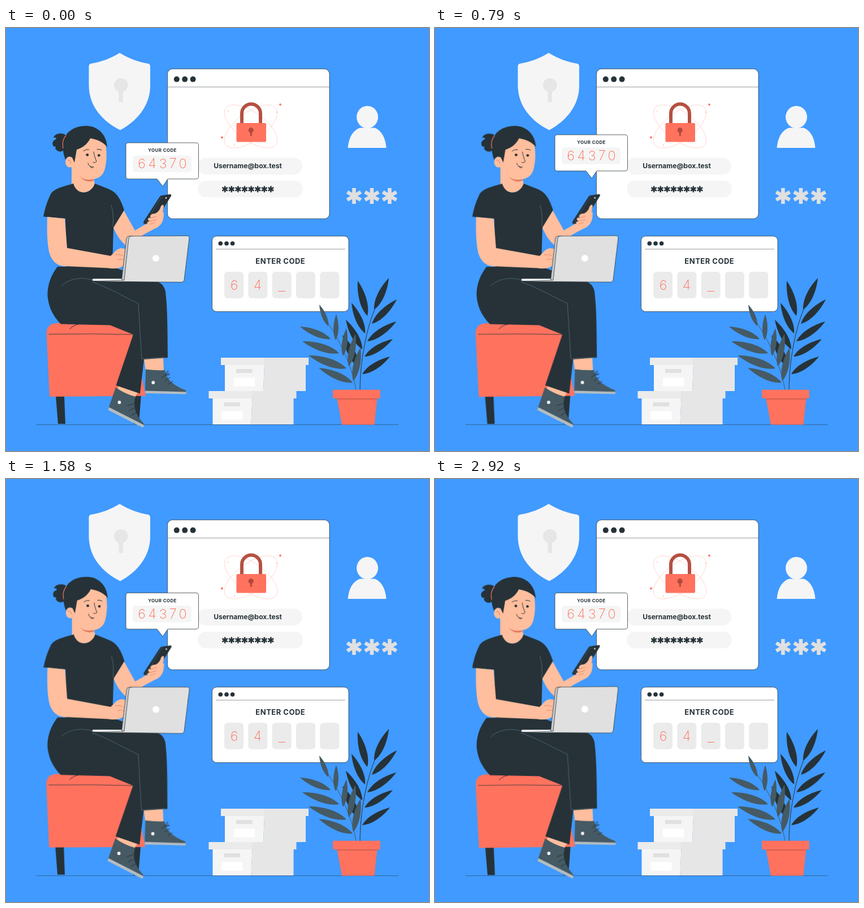
Write an HTML page that moves like this. It is 748x748 px and loops after 2.96 s.

```html
<!DOCTYPE html>
<html lang="en">
<head>
<meta charset="utf-8">
<title>Two-step sign-in</title>
<style>
  html, body { margin: 0; width: 100%; height: 100%; overflow: hidden; background: #409aff; }
  svg { display: block; width: 100%; height: 100%; }
  text { font-family: Inter, "Open Sans", sans-serif; font-weight: 700; fill: #263238; text-anchor: middle; }
  .digits { font-size: 23.5px; font-weight: 200; fill: #ff725e; }
  .dark { fill: #263238; }
  .coral { fill: #ff725e; }
  .skin { fill: #ffbe9d; }
  .slate { fill: #455a64; }
  .pale { fill: #f5f5f5; }
  .mist { fill: #ebebeb; }
  .shade { fill: #e6e6e6; }
  .grey { fill: #e0e0e0; }
  .white { fill: #fff; }
  .edge { stroke: #263238; stroke-width: .75; }
  .line { fill: none; stroke: #263238; stroke-width: 1; stroke-linecap: round; stroke-linejoin: round; }
  .rule { fill: none; stroke: #263238; stroke-width: .7; opacity: .7; }
  .seam { fill: none; stroke: #55707d; stroke-width: .8; stroke-linejoin: round; }

  /* 1.5 s cycles cut at 2.96 s, where the loop restarts */
  #person { transform-origin: 193px 440px; animation: sway 2.96s linear infinite; }
  #bubble { animation: hover 2.96s linear infinite; }
  @keyframes sway {
    0% { transform: rotate(0deg); }
    12.669% { transform: rotate(1deg); }
    38.007% { transform: rotate(-1deg); }
    63.345% { transform: rotate(1deg); }
    88.682% { transform: rotate(-1deg); }
    100% { transform: rotate(-.107deg); }
  }
  @keyframes hover {
    0%, 50.676% { transform: translateY(0); }
    25.338%, 76.014% { transform: translateY(-15px); }
    100% { transform: translateY(-.8px); }
  }
</style>
</head>
<body>
<svg viewBox="0 0 748 748">
  <defs>
    <g id="star"><path d="M0-14V14M-12-7L12 7M-12 7L12-7" fill="none" stroke-width="6.6"/></g>
    <g id="crate">
      <path class="pale" d="M7 13H77L75 59H7Z"/>
      <path class="shade" d="M77 13H150V59H75Z"/>
      <path class="mist" d="M0 0H77V13H0Z"/>
      <path class="shade" d="M76 0H155V13H76Z"/>
      <rect class="grey" x="27" y="20" width="28.5" height="7"/>
      <rect class="white" x="23" y="35.5" width="37" height="15"/>
    </g>
  </defs>

  <rect width="748" height="748" fill="#409aff"/>

  <g id="shield">
    <path class="pale" d="M201 44C185 54 168 60 150 63Q146.500 64 146.500 68V102C147 139 171 165 202 180.500C231 165 255 138 255 102V68Q255 64 251.500 63C234 60 217 54 201 44Z"/>
    <circle class="shade" cx="203.300" cy="101" r="12.300"/>
    <rect class="shade" x="199.500" y="108" width="7.500" height="23" rx="2"/>
  </g>

  <g id="user" class="pale">
    <ellipse cx="639" cy="157.500" rx="19" ry="19.800"/>
    <path d="M604.500 212C606 194 613 181 626 176.500H652C664 181 671 194 672.500 212Z"/>
  </g>
  <g id="bigStars" stroke="#e0e0e0"></g>

  <g id="login">
    <rect class="white edge" x="285.500" y="72.300" width="286.500" height="265" rx="9"/>
    <path class="rule" d="M286 104.300H572"/>
    <g class="dark"><circle cx="301.800" cy="90.600" r="5"/><circle cx="316.200" cy="90.600" r="5"/><circle cx="330.600" cy="90.600" r="5"/></g>
    <g fill="none" stroke="#ffd0c8" stroke-width=".8">
      <ellipse cx="433" cy="174" rx="55" ry="25" transform="rotate(36 433 174)"/>
      <ellipse cx="433" cy="174" rx="55" ry="25" transform="rotate(-36 433 174)"/>
    </g>
    <g class="coral">
      <circle cx="485" cy="135.300" r="1.900"/><circle cx="382" cy="193.500" r="1.900"/>
      <circle cx="479" cy="149" r=".7"/><circle cx="393" cy="147" r=".7"/><circle cx="404" cy="207" r=".8"/>
    </g>
    <path d="M417 171V151A16.500 16.500 0 0 1 450 151V171" fill="none" stroke="#b55042" stroke-width="6"/>
    <rect class="coral" x="407.500" y="168" width="52.500" height="33.500" rx="2"/>
    <g fill="#b04a3c"><circle cx="433.200" cy="180.700" r="4.600"/><rect x="431.800" y="182" width="3" height="9" rx="1"/></g>
    <rect class="pale" x="339" y="229.500" width="185" height="29.500" rx="14.700"/>
    <rect class="pale" x="339" y="270" width="186" height="29.500" rx="14.700"/>
    <text x="427.500" y="248" font-size="12">Username@box.test</text>
    <g id="smallStars" stroke="#263238"></g>
  </g>

  <g id="enter">
    <rect class="white edge" x="364.500" y="368" width="241.500" height="133.500" rx="8"/>
    <path class="rule" d="M371 391H600"/>
    <g class="dark"><circle cx="379.300" cy="381" r="3.800"/><circle cx="390" cy="381" r="3.800"/><circle cx="400.600" cy="381" r="3.800"/></g>
    <text x="485.300" y="416.700" font-size="13" letter-spacing=".5">ENTER CODE</text>
    <g id="slots" class="mist"></g>
    <text class="digits" x="403.700 445" y="463">64</text>
    <path d="M481.500 465.500H494" stroke="#ff725e"/>
  </g>

  <path class="rule" d="M54 701.500H694"/>
  <use href="#crate" x="380" y="583"/>
  <use href="#crate" x="358.500" y="642"/>

  <g id="plant">
    <g id="darkFrond" class="dark"><path class="line" d="M626 641C626 590 637 530 655 490"/></g>
    <g id="lightFrond" class="slate"><path class="line" d="M619 641C614 605 594 558 567 518" style="stroke:#455a64"/></g>
    <path class="coral" d="M585 654H656.500L651.500 701.500H594Z"/>
    <path d="M585 655H656.500L656.200 657H585.200Z" fill="#d85f4e"/>
    <rect class="coral" x="578" y="639.700" width="83.700" height="15.300"/>
  </g>

  <g id="person">
    <g id="stool">
      <path class="dark" d="M88 650H103L105 700H92Z"/>
      <path class="dark" d="M222 648H239L235 700H226Z"/>
      <path class="coral" d="M71.500 539Q72 524 88 522H170L222 531L247 650.500L77 652Z"/>
      <path class="line" d="M76 541.500Q150 540 225 542" stroke-width=".7" opacity=".8"/>
    </g>

    <g id="backFoot">
      <path class="skin" d="M244 584L278 583L279 606H247Z"/>
      <path class="slate" d="M247 603.500Q264 606 281 605C283 621 297 633 317 640L319 644H246Z"/>
      <path d="M246 641.500L318.500 643.500Q320 647 317 647.500L246.500 646Z" fill="#b4bcc0"/>
      <circle class="pale" cx="260.300" cy="627" r="2.900"/>
      <path class="line" d="M276 618L284 612M281 624L290 618M287 630L295 625M282 613C285 602 291 606 283 613C292 609 292 614 283 614"/>
    </g>
    <g id="frontFoot">
      <path class="skin" d="M201 630L234 642L227 655L196 640Z"/>
      <path class="slate" d="M194 635.500Q210 647 229 652C223 670 231 686 244 700L242 704L181 673Z"/>
      <path d="M182 670.500L243 701.500Q245 705 241.500 706.500L180.500 675.500Z" fill="#b4bcc0"/>
      <circle class="pale" cx="200.500" cy="662" r="2.900"/>
      <path class="line" d="M215 668L226 664M217 677L227 672M222 685L231 680"/>
    </g>

    <g id="trousers">
      <path class="dark" d="M91 422C79 438 73 455 73.500 474C76 499 87 513 97 523.500L184 525.500L225 542L194.500 632L237 646.500L244 586L286 583C285.500 540 286 500 282 466C279 452 270 447 255 447L188 422Z"/>
      <path class="seam" d="M98 456C112 442 137 440 154 446M152 449C180 458 208 475 234 487L240 585L281 582.500"/>
      <path class="line" d="M113 532Q121 523 136 523"/>
    </g>

    <g id="head">
      <path class="skin" d="M116 240V276C123 297 151 295 157 276L154 260Z"/>
      <path d="M130 262Q139 271 155 267L155 270Q140 275 130 262Z" fill="#e2795f"/>
      <ellipse class="skin" cx="113" cy="237" rx="8" ry="9.500"/>
      <path class="skin" d="M116 230L126 200Q154 185 176 205C179 222 178 239 174 252C169 266 155 270 142 266C126 262 117 253 115 244Z"/>
      <path class="dark" d="M105 233C92 196 109 174 141 173C163 173 178 189 179 211C174 203 162 197 149 195C144 206 133 213 125 215L121 238L117 229Q110 224 105 233Z"/>
      <path class="dark" d="M105 189C97 184 86 187 84 194C88 193 90 195 88 197C81 199 81 207 85 210C87 208 89 210 87 213C92 221 102 220 104 212Z"/>
      <path d="M106 190Q98 199 101 213" fill="none" stroke="#ff725e" stroke-width="1.200"/>
      <g transform="translate(-2 0)">
        <g class="dark"><circle cx="145.800" cy="224.300" r="2.400"/><circle cx="166.300" cy="225.200" r="2.300"/></g>
        <path class="line" d="M139 217.500Q143 214 148.500 215M163 214.500Q167 213.500 171 216" stroke-width="1.500"/>
        <path class="line" d="M157 219C158 226 160 231 162 236Q160 239 156 237.500"/>
        <path class="line" d="M147 239Q148 246 157 246M151 245Q152 248 155 247"/>
      </g>
      <path d="M109 234Q114 233 115 240" fill="none" stroke="#e2795f"/>
    </g>

    <path class="skin" d="M189 350C195 367 205 380 216 388L242 366L268 352C277 346 279 337 279 326L262 326L247 347L228 358L208 322Z"/>
    <g id="shirt">
      <path class="dark" d="M119 275C104 280 83 283 78 296Q70 312 66 333.500L105 337L107 424H188L190 353L209 322C203 303 196 290 181 284.500L157 275C151 294 126 298 119 275Z"/>
      <path class="seam" d="M186 313Q191 330 189 351"/>
    </g>

    <g id="phone">
      <path class="dark" d="M272 298Q273 296 276 296L290 294Q293 294 292 297L264 342Q261 346 257 346L245 346.500Q242 346 243.500 342Z"/>
      <path d="M276 297L247 344" fill="none" stroke="#455a64" stroke-width=".8"/>
      <circle class="pale" cx="283" cy="300.500" r="1.300"/>
      <path class="skin" d="M274 315Q278 310 279 315L277 327C281 338 275 348 267 353L247 361L252 347C248 346 249 342 254 342C249 339 251 334 256 336C253 331 258 328 264 328Q271 325 274 315Z"/>
      <path d="M256 336L266 333M254 342L266 339M254 347L264 344" stroke="#e2795f" stroke-width=".8"/>
    </g>

    <path class="skin" d="M73 334C72 360 73 384 77 399C82 413 89 419 101 421L181 424.500C195 427 207 424 211 416L213 392C205 387 197 390 192 396L185 403L108 389L104 337Z"/>
    <path d="M193 401Q201 399 207 403M197 410Q203 407 208 410" fill="none" stroke="#e2795f" stroke-width=".8"/>

    <g id="laptop">
      <path class="pale edge" d="M154 443H211V448.500L155 447.500Q152 447 152 445Z"/>
      <path class="edge" d="M213 372Q214 368 218 368L224 368L211 449L204.500 445Z" fill="#c9c9c9"/>
      <path class="grey edge" d="M217 372Q218 368 222 368L320 367.500Q324.500 367.500 324 372L315 446Q314 449.500 310 449.500L153 448L209 446Z"/>
      <circle class="white" cx="265" cy="407.300" r="6"/>
    </g>
  </g>

  <g id="bubble">
    <path class="white edge" d="M216.500 203H336Q340.500 203 340.500 207.500V262.500Q340.500 267 336 267H286L277.300 280L267 267H216.500Q212 267 212 262.500V207.500Q212 203 216.500 203Z"/>
    <rect class="pale" x="224" y="225.500" width="104" height="29.500" rx="5"/>
    <text x="276.500" y="219.500" font-size="8" letter-spacing=".35">YOUR CODE</text>
    <text class="digits" x="240 258.800 277.800 295.300 312.500" y="248.500">64370</text>
  </g>
</svg>
<script>
  const add = (id, tag, attrs) => {
    const el = document.createElementNS("http://www.w3.org/2000/svg", tag);
    for (const key in attrs) el.setAttribute(key, attrs[key]);
    document.getElementById(id).append(el);
  };

  const star = (id, x, y, scale) =>
    add(id, "use", { href: "#star", transform: `translate(${x} ${y}) scale(${scale})` });
  for (let i = 0; i < 3; i++) star("bigStars", 615.4 + i * 31.5, 297, 1);
  for (let i = 0; i < 8; i++) star("smallStars", 387.2 + i * 11.6, 285, 0.4);

  for (let i = 0; i < 5; i++)
    add("slots", "rect", { x: 386 + i * 42.3, y: 431, width: 34, height: 47, rx: 6 });

  // A slender leaf from its base (bx, by) to its tip (tx, ty)
  function leaf(id, [bx, by, tx, ty]) {
    const dx = tx - bx, dy = ty - by;
    const at = (along, side) => `${bx + dx * along - dy * side} ${by + dy * along + dx * side}`;
    add(id, "path", {
      d: `M${bx} ${by}C${at(.25, .14)} ${at(.65, .12)} ${tx} ${ty}C${at(.65, -.12)} ${at(.25, -.14)} ${bx} ${by}Z`
    });
  }
  [
    [651, 498, 677, 442], [647, 523, 691, 480], [639, 554, 690, 519],
    [634, 581, 684, 550], [630, 612, 679, 581], [639, 509, 622, 447],
    [635, 540, 611, 486], [630, 568, 601, 516], [625, 602, 595, 543]
  ].forEach(l => leaf("darkFrond", l));
  [
    [570, 527, 554, 489], [583, 552, 584, 506], [596, 580, 602, 531],
    [606, 598, 618, 541], [614, 624, 627, 565], [574, 550, 520, 528],
    [589, 575, 524, 554], [602, 602, 535, 579], [613, 627, 553, 601]
  ].forEach(l => leaf("lightFrond", l));
</script>
</body>
</html>
```
